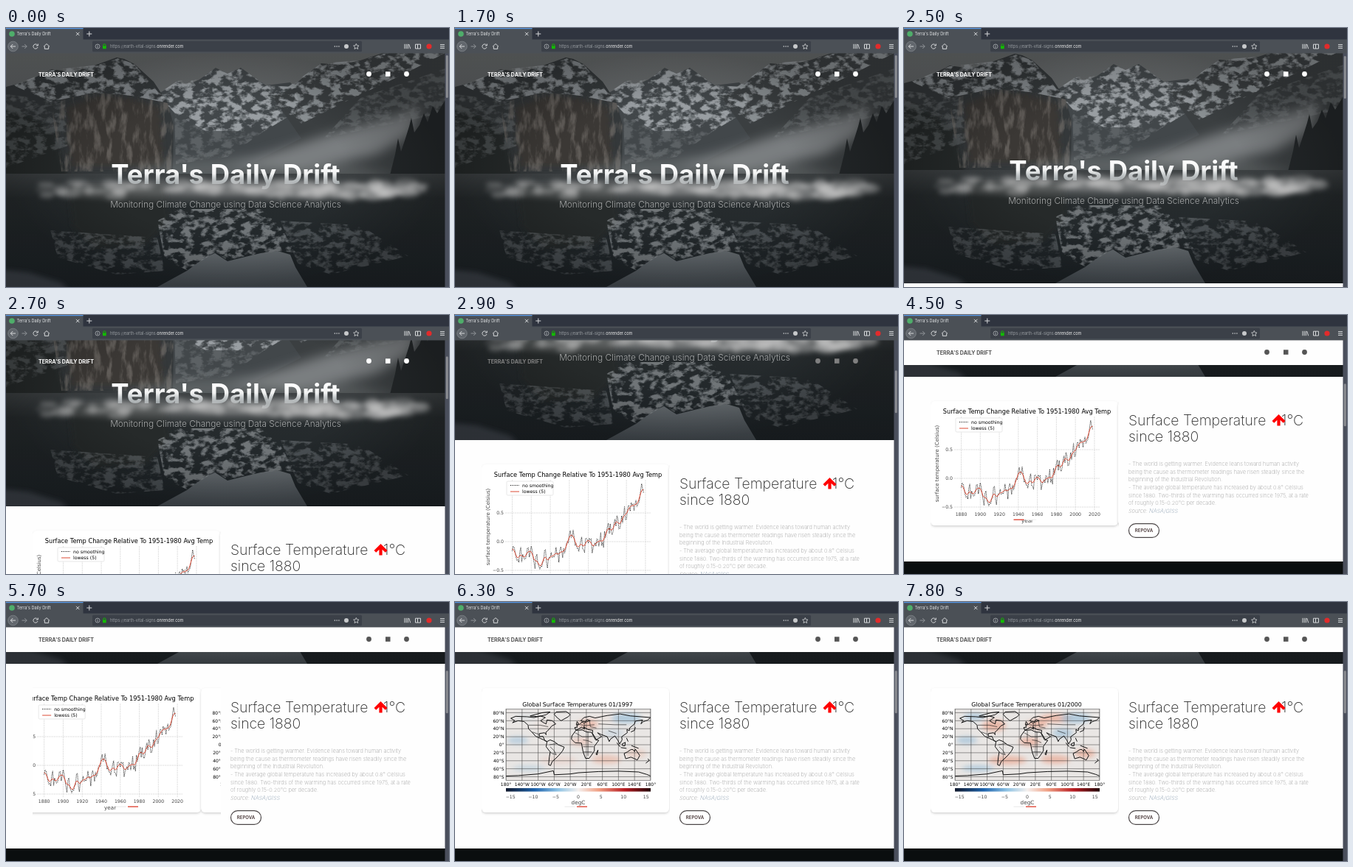
Recreate the animation shown at these times as an HTML page. Size 600 px wide and 352 px high, loop 8000 ms.

```html
<!DOCTYPE html>
<html lang="en">
<head>
<meta charset="utf-8">
<title>Terra's Daily Drift</title>
<style>
  html, body { margin: 0; width: 100%; height: 100%; overflow: hidden; background: #fefefe; }
  svg { display: block; width: 100vw; height: 100vh; }
  text { font-family: Inter, sans-serif; white-space: pre; }
  .plot text { font-family: "DejaVu Sans", sans-serif; font-size: 6.2px; fill: #444; }
  .plot .title { font-size: 8.25px; fill: #000; }
  .mid { text-anchor: middle; }
  .end { text-anchor: end; }
  .line { fill: none; stroke-linejoin: round; }
  .world path { vector-effect: non-scaling-stroke; fill: none; stroke: #111; }
</style>
</head>
<body>
<svg viewBox="0 0 600 352">
  <defs>
    <linearGradient id="sky" x2="0" y2="1">
      <stop stop-color="#686b6c"/><stop offset=".5" stop-color="#606466"/><stop offset="1" stop-color="#4a4e50"/>
    </linearGradient>
    <linearGradient id="lake" x2="0" y2="1">
      <stop stop-color="#3c4042"/><stop offset=".22" stop-color="#272c2e"/><stop offset="1" stop-color="#1d2327"/>
    </linearGradient>
    <linearGradient id="mirror" x2="0" y2="1">
      <stop stop-color="#666c70"/><stop offset="1" stop-color="#474e54"/>
    </linearGradient>
    <linearGradient id="titleFill" gradientUnits="userSpaceOnUse" x1="0" x2="0" y1="186" y2="213">
      <stop stop-color="#fff"/><stop offset=".45" stop-color="#f1f2f2"/>
      <stop offset="1" stop-color="#b9c4c8" stop-opacity=".7"/>
    </linearGradient>
    <radialGradient id="shade">
      <stop offset=".55" stop-opacity="0"/><stop offset="1" stop-opacity=".25"/>
    </radialGradient>
    <linearGradient id="degrees">
      <stop stop-color="#10182c"/><stop offset=".2" stop-color="#1d63ad"/>
      <stop offset=".36" stop-color="#8fc3e4"/><stop offset=".5" stop-color="#f4f0ee"/>
      <stop offset=".64" stop-color="#f0a084"/><stop offset=".82" stop-color="#b81c22"/>
      <stop offset="1" stop-color="#230608"/>
    </linearGradient>
    <filter id="soft" x="-20%" y="-60%" width="140%" height="220%"><feGaussianBlur stdDeviation="3"/></filter>
    <filter id="softer" x="-30%" y="-60%" width="160%" height="220%"><feGaussianBlur stdDeviation="8"/></filter>
    <filter id="snow" color-interpolation-filters="sRGB">
      <feTurbulence type="fractalNoise" baseFrequency=".075 .12" numOctaves="4" seed="4"/>
      <feColorMatrix values="0 0 0 0 .6  0 0 0 0 .62  0 0 0 0 .635  5 0 0 0 -2.15"/>
      <feComposite operator="in" in2="SourceGraphic"/>
    </filter>
    <filter id="rock" color-interpolation-filters="sRGB">
      <feTurbulence type="fractalNoise" baseFrequency=".11 .035" numOctaves="4" seed="9"/>
      <feColorMatrix values="0 0 0 0 .48  0 0 0 0 .46  0 0 0 0 .44  4 0 0 0 -1.9"/>
      <feComposite operator="in" in2="SourceGraphic"/>
    </filter>
    <filter id="shadow" x="-10%" y="-10%" width="120%" height="125%">
      <feDropShadow dx="0" dy="1.5" stdDeviation="1.8" flood-opacity=".18"/>
    </filter>
    <clipPath id="card"><rect x="36" y="110" width="255" height="184"/></clipPath>
    <clipPath id="mapArea"><rect x="69" y="145.5" width="196" height="97"/></clipPath>
    <clipPath id="heroArea"><rect y="34" width="595" height="318"/></clipPath>
  </defs>

  <g id="page">
    <rect y="80" width="595" height="256" fill="#fefefe"/>
    <rect y="335" width="595" height="320" fill="#0a0e0f"/>

    <g transform="translate(0 -268)"><g clip-path="url(#heroArea)">
      <rect y="34" width="595" height="170" fill="url(#sky)"/>
      <path fill="#42474a" d="M205 90L219 82 232 72 245 78 262 70 284 54 300 62 318 54 335 66 352 78 385 74 430 120V200H205Z"/>
      <path fill="#3b3f41" d="M360 92L380 86 411 60 427 48 452 50 480 44 510 34H595V200H300L400 150Z"/>
      <path fill="#34383a" d="M0 80L30 72 62 56 90 60 125 49 150 40 160 42 174 49 200 73 219 102 227 132 226 200H0Z"/>
      <path fill="#3b3936" filter="url(#soft)" d="M82 108L125 92 170 96 208 108 214 188H88Z"/>
      <path fill="#25292b" filter="url(#soft)" d="M-9 105L30 118 66 140 84 205H-9Z"/>
      <g filter="url(#snow)">
        <path d="M205 90L232 72 262 70 284 54 300 62 318 54 352 78 390 80 400 110 350 140 270 140 228 115Z"/>
        <path opacity=".85" d="M365 92L427 48 480 44 515 34H595L540 62 460 100 400 130Z"/>
        <path opacity=".8" d="M10 78L62 57 125 50 152 41 174 49 219 102 170 92 120 88 60 100Z"/>
        <path opacity=".3" d="M0 90L80 100 84 160 0 190ZM595 55V115L430 150 480 95ZM228 115L270 140 350 140 300 175 230 185Z"/>
      </g>
      <path opacity=".6" filter="url(#rock)" d="M60 100L120 88 170 92 219 102 227 132 224 195H75Z"/>
      <g fill="#85898b" filter="url(#softer)">
        <path opacity=".85" d="M300 186L370 166 430 147 520 121 565 105 548 145 500 172 400 194Z"/>
        <path opacity=".4" d="M140 204L215 182 320 176 480 190 540 204Z"/>
      </g>
      <path fill="#24282a" d="M520 200L527 172 531 150 535 168 541 150 546 134 549 122 553 142 560 132 566 116 571 128 578 106 584 116 595 98V200Z"/>
      <rect y="198" width="595" height="154" fill="url(#lake)"/>
      <path fill="#262a2b" filter="url(#soft)" d="M85 215H215L222 260 190 295 120 300 90 270Z"/>
      <path fill="#3a4147" filter="url(#soft)" d="M-9 328L30 332 75 346 90 362H-9Z"/>
      <path fill="url(#mirror)" d="M205 352L245 330 268 313 283 306 300 317 320 312 345 306 368 303 385 308 392 325 408 352Z"/>
      <g filter="url(#snow)">
        <path opacity=".65" d="M205 262L235 246 345 246 372 270 392 305 368 303 320 311 300 316 283 305 245 329 215 315Z"/>
        <path opacity=".35" d="M60 275L205 285 215 330 150 335 70 312ZM372 262L480 268 545 310 440 335 395 320Z"/>
      </g>
      <rect y="34" width="595" height="318" fill="url(#shade)"/>
      <text class="mid" x="297.5" y="211.5" font-size="36.5" font-weight="700" fill="url(#titleFill)">Terra's Daily Drift</text>
      <g id="fog" fill="#c6c7c6" filter="url(#soft)"></g>
      <text class="mid" x="297.5" y="244" font-size="11.85" font-weight="300" fill="#fff" opacity=".58">Monitoring Climate Change using Data Science Analytics</text>
    </g></g>

    <g clip-path="url(#card)" class="plot">
      <g id="chartSlide">
        <rect x="36" y="117" width="254" height="169" rx="6" fill="#fff" filter="url(#shadow)"/>
        <text class="title mid" x="166.5" y="134">Surface Temp Change Relative To 1951-1980 Avg Temp</text>
        <g id="chart"></g>
        <rect x="70" y="140" width="63" height="19" rx="1.5" fill="#fff" stroke="#ddd" stroke-width=".7"/>
        <path d="M75 145.5H87" stroke="#000" stroke-dasharray="1 1.3"/>
        <path d="M75 154H87" stroke="#dc4a35"/>
        <text x="91" y="147.8" style="fill:#000">no smoothing</text>
        <text x="91" y="156.4" style="fill:#000">lowess (5)</text>
        <text class="mid" style="font-size:7.2px" x="167" y="282">year</text>
        <text class="mid" style="font-size:7px" transform="translate(46.5 202) rotate(-90)">surface temperature (Celsius)</text>
      </g>
      <g id="mapSlide">
        <rect x="36" y="117" width="254" height="169" rx="6" fill="#fff" filter="url(#shadow)"/>
        <text id="mapTitle" class="title mid" style="font-size:7.9px" x="166" y="141.5"></text>
        <g clip-path="url(#mapArea)">
          <rect x="69" y="145" width="196" height="98" fill="#e9e6e4"/>
          <g id="heat" filter="url(#soft)"></g>
          <g id="grid"></g>
          <g class="world" transform="translate(167 194) scale(.544 -.544)">
            <path d="M-168 66L-156 71-128 70-110 68-95 72-82 68-94 60-88 56-80 52-78 62-65 60-56 52-66 47-70 42-76 35-81 31-80 25-84 30-97 28-97 20-88 21-83 10-78 8-86 12-95 16-106 21-115 31-124 40-125 49-135 58-150 60-164 55-158 60Z"/>
            <path d="M-78 8L-70 12-60 8-50 0-35-6-39-15-48-26-57-35-65-42-69-52-74-50-72-30-70-18-80-5Z"/>
            <path d="M-55 82L-30 83-20 75-25 70-43 60-53 68-60 76ZM-120 72L-105 76-90 80-70 82-80 75-100 70Z"/>
            <path d="M-6 36L10 37 20 32 33 31 43 12 51 11 40-4 40-15 33-26 27-34 18-34 12-18 9-2 8 4-8 5-17 14-16 22Z"/>
            <path d="M-9 43L-2 44-4 48 5 52 9 57 14 54 22 58 30 60 22 63 17 57 6 60 14 68 28 71 42 67 72 73 104 77 130 72 180 68 172 61 162 58 156 52 160 62 142 59 140 52 128 42 127 35 121 38 122 30 108 20 109 12 103 2 98 12 91 22 80 14 77 8 72 20 56 26 48 30 58 20 45 13 35 29 36 36 24 38 13 45 16 39 8 44 0 39-6 36Z"/>
            <path d="M114-22L122-18 131-12 136-12 140-17 142-11 153-27 147-38 138-34 131-31 118-35Z"/>
            <path d="M131 32L140 36 142 44M96 5L104-5M106-7L120-9M109 2L117 6 116-3 110-2ZM132-2L150-9M120 17L124 8M173-35L177-39 168-46M44-24L49-13 47-25ZM-5 50L1 52-3 58Z"/>
            <path d="M-180-78L-150-77-100-73-62-65-60-75-20-73 0-70 50-67 100-66 150-68 170-74 180-78"/>
            <path stroke-width=".6" d="M-8 30L10 20 25 20 36 22M12 12L24 10 35 5M12-5L38-5M13-18L34-18M24 32V-28M0 35V7M5 50L20 48 40 50M15 54V40M28 60L30 45 45 42M50 52L90 50 120 50M75 35L95 28M-124 49L-95 49-75 45M-141 70V60M-115 32L-98 26M-70-5L-60-15-55-25-65-22-70-18M-72 0L-52 3"/>
          </g>
        </g>
        <rect x="69" y="145.5" width="196" height="97" fill="none" stroke="#555" stroke-width=".6"/>
        <g id="mapLabels"></g>
        <rect x="69" y="253" width="196" height="4.6" fill="url(#degrees)"/>
        <text class="mid" style="font-size:7.3px" x="167" y="274.7">degC</text>
      </g>
      <path id="dotA" d="M148.5 278.2H162.5" stroke-width="1.4"/>
      <path id="dotB" d="M165 278.2H179" stroke-width="1.4"/>
    </g>

    <g font-size="19.4" font-weight="200" fill="#222">
      <text x="304" y="149.5">Surface Temperature</text>
      <text x="511" y="149.5">1°C</text>
      <text x="304" y="171.5">since 1880</text>
    </g>
    <path fill="#f00" d="M507.5 135L516.5 144 513.8 146.7 509.6 142.7V150.5H505.4V142.7L501.2 146.7 498.5 144Z"/>
    <g id="story" font-size="7.4" font-weight="200" fill="#999"></g>
    <rect x="304.5" y="283.7" width="41" height="18.6" rx="9.3" fill="#fff" stroke="#4c4748" stroke-width="1.2"/>
    <text class="mid" x="325" y="295.2" font-size="6" font-weight="700" fill="#5a4b4b">REPOVA</text>
  </g>

  <rect id="navBack" y="34" width="595" height="34" fill="#fefefe"/>
  <g id="nav">
    <text x="44" y="65.6" font-size="7.1" font-weight="700">TERRA'S DAILY DRIFT</text>
    <circle cx="491.5" cy="62.5" r="3.4"/><rect x="514" y="59.3" width="6.5" height="6.5"/><circle cx="542.5" cy="62.5" r="3.4"/>
  </g>

  <rect x="594.5" y="34" width="5.5" height="318" fill="#4a4f5c"/>
  <rect id="thumb" x="595.8" y="37" width="3" height="58" rx="1.5" fill="#8b8d92"/>

  <rect width="600" height="16" fill="#2f343f"/>
  <rect y="15.5" width="600" height="18.9" fill="#4b5056"/>
  <rect width="104.5" height="16" fill="#4b5056"/>
  <rect width="104.5" height="1.2" fill="#5294e2"/>
  <circle cx="8" cy="8" r="3.8" fill="#4fae6a"/>
  <text x="14.5" y="10.2" font-size="5.6" fill="#e4e6e8">Terra's Daily Drift</text>
  <rect x="117" y="17.8" width="365" height="14.4" rx="1.5" fill="#3b4048"/>
  <circle cx="9.5" cy="25" r="6.8" fill="#62676d" stroke="#858a8f" stroke-width=".7"/>
  <g fill="none" stroke="#d6d8da">
    <path d="M95 5.8L99.4 10.2M99.4 5.8L95 10.2M109.3 8H116.3M112.8 4.5V11.5"/>
    <path d="M13 25H6.3M9.3 22L6.3 25 9.3 28"/>
    <path stroke="#8f9397" d="M21.5 25H28.2M25.2 22L28.2 25 25.2 28"/>
    <path d="M42.6 23.3A3.1 3.1 0 1 0 43 26M43.3 21.5V24H40.8M51 25.2L55 21.6 59 25.2M52.3 25V28.4H57.7V25"/>
    <circle cx="124" cy="25" r="3" stroke="#a9adb1" stroke-width=".8"/><path stroke="#a9adb1" d="M124 24.4V26.8M124 22.8V23.6"/>
    <path stroke="#12bc00" d="M131.6 25V23.5A1.7 1.7 0 0 1 135 23.5V25"/>
    <path stroke-width=".8" d="M474.3 21.4L475.4 23.8 478 24.1 476.1 25.9 476.6 28.5 474.3 27.2 472 28.5 472.5 25.9 470.6 24.1 473.2 23.8Z"/>
    <path d="M540 21.8V28.2M542.2 21.8V28.2M544.4 21.8V28.2M545.8 22L547.6 28.2M554.5 22.2H561.5V28H554.5ZM557.5 22V28M588 22.6H594M588 25H594M588 27.4H594"/>
    <path stroke-width="1.6" stroke-linecap="round" stroke-dasharray="0 2.8" d="M445.3 25H451"/>
  </g>
  <rect x="131" y="24.3" width="4.7" height="4" rx=".5" fill="#12bc00"/>
  <circle cx="461" cy="25" r="3" fill="#c7c9cb"/>
  <circle cx="573" cy="25" r="3.6" fill="#e22b2b"/>
  <text x="141" y="27" font-size="5.5" fill="#989ca1">https://earth-vital-signs.<tspan fill="#eee">onrender.com</tspan></text>
</svg>

<script>
const LOOP = 8000, SCROLL_END = 268;
const el = id => document.getElementById(id);
const clamp = v => Math.min(1, Math.max(0, v));
const mix = (a, b, k) => a + (b - a) * k;
const shift = (id, x, y) => el(id).setAttribute('transform', `translate(${x} ${y})`);
const label = (x, y, s, cls = 'mid', style = '') => `<text class="${cls}" x="${x}" y="${y}" style="${style}">${s}</text>`;

let seed = 7;
const random = () => (seed = seed * 16807 % 2147483647) / 2147483647;

// Yearly temperature anomalies since 1880, in hundredths of a degree
const anomalies = `-16 -8 -10 -17 -28 -33 -31 -36 -17 -10 -35 -22 -27 -31 -30 -23 -11 -11 -27 -17
  -8 -15 -28 -37 -47 -26 -22 -39 -43 -48 -43 -44 -36 -34 -15 -14 -36 -46 -30 -27
  -27 -19 -28 -26 -27 -22 -10 -22 -20 -36 -16 -9 -16 -28 -12 -20 -15 -3 0 -2
  13 19 7 9 20 9 -7 -3 -11 -11 -17 -7 1 8 -13 -14 -19 5 6 3 -3 6 3 5 -20 -11 -6 -2 -8 5
  3 -8 1 16 -7 -1 -10 18 7 16 26 32 14 31 16 12 18 32 39 27 45 40 22 23 31 45 33 46 61 38
  39 54 63 62 53 68 64 66 54 66 72 61 65 68 75 90 101 92 85`.trim().split(/\s+/).map(Number);

const smooth = anomalies.map((_, i) => {
  let sum = 0, total = 0;
  anomalies.forEach((v, j) => {
    const weight = Math.exp(-((i - j) ** 2) / 6);
    sum += weight * v;
    total += weight;
  });
  return sum / total;
});

const yearX = year => 77.5 + (year - 1880) * 1.289;
const tempY = v => 222 - v * .78;
const trace = values => 'M' + values.map((v, i) => `${yearX(1880 + i).toFixed(1)} ${tempY(v).toFixed(1)}`).join('L');

function buildChart() {
  let out = '', lines = '';
  for (let year = 1880; year <= 2020; year += 20) {
    lines += `M${yearX(year)} 138V266`;
    out += label(yearX(year), 273.2, year);
  }
  for (const v of [50, 0, -50]) {
    lines += `M68 ${tempY(v)}H265`;
    out += label(66, tempY(v) + 2.3, (v / 100).toFixed(1).replace('-', '−'), 'end');
  }
  el('chart').innerHTML = `<path d="${lines}" stroke="#d4d4d4" stroke-width=".7" stroke-dasharray="2.5 .7"/>${out}
    <path class="line" d="${trace(anomalies)}" stroke="#111" stroke-width="1" stroke-dasharray="1 1.2"/>
    <path class="line" d="${trace(smooth)}" stroke="#dc4a35" stroke-width="1"/>`;
}

function buildMap() {
  let out = '', lines = '';
  const black = 'fill:#000;font-size:6px';
  for (let lat = 80; lat >= -80; lat -= 20) {
    const y = 194 - lat * .544;
    lines += `M69 ${y}H265`;
    out += label(66.5, y + 2.2, Math.abs(lat) + '°' + (lat > 0 ? 'N' : lat < 0 ? 'S' : ''), 'end', black);
  }
  for (let lon = -180; lon <= 180; lon += 40) {
    const x = 167 + lon * .544;
    lines += `M${x} 145V243`;
    out += label(x, 249.6, Math.abs(lon) + '°' + (Math.abs(lon) === 180 ? '' : lon < 0 ? 'W' : 'E'), 'mid', black);
  }
  for (let v = -15; v <= 15; v += 5) out += label(167 + v * 6.12, 266.6, String(v).replace('-', '−'));
  el('grid').innerHTML = `<path d="${lines}" stroke="#333" stroke-width=".5"/>`;
  el('mapLabels').innerHTML = out;
}

// Warm and cold regions: x, y, width, height, colour
const warm = '#e9967a', cold = '#86b5d6';
const regions = [
  [205, 158, 22, 6, warm], [232, 158, 20, 7, cold], [122, 168, 16, 8, warm], [180, 166, 14, 6, warm],
  [95, 156, 14, 5, cold], [85, 188, 14, 5, cold], [140, 215, 26, 6, warm], [205, 214, 20, 6, warm],
  [215, 178, 14, 6, cold], [100, 226, 22, 4, cold], [170, 190, 14, 6, warm], [245, 206, 14, 6, warm]
];

const fog = Array.from({ length: 90 }, () => ({
  x: 55 + 505 * random(), y: 210 + 19 * random(), rx: 6 + 14 * random(), ry: 3 + 5 * random()
}));

const ellipse = (x, y, rx, ry, opacity, fill = '') =>
  `<ellipse cx="${x.toFixed(1)}" cy="${y}" rx="${rx}" ry="${ry}" opacity="${opacity.toFixed(2)}" ${fill && `fill="${fill}"`}/>`;

function buildStory() {
  const lines = ['- The world is getting warmer. Evidence leans toward human activity',
    'being the cause as thermometer readings have risen steadily since the',
    'beginning of the Industrial Revolution.',
    '- The average global temperature has increased by about 0.8° Celsius',
    'since 1880. Two-thirds of the warming has occurred since 1975, at a rate',
    'of roughly 0.15-0.20°C per decade.',
    '<tspan font-style="italic">Source: <tspan fill="#7d93a8">NASA/GISS</tspan></tspan>'];
  el('story').innerHTML = lines.map((s, i) => label(304, 205.2 + i * 10.6, s, '')).join('');
}

// Scroll offsets every 100 ms, beginning at 2400 ms
const scrollSteps = [0, 5, 38, 92, 142, 182, 214, 238, 255, 266, SCROLL_END];
const scrollAt = t => scrollSteps[Math.max(0, Math.min(10, Math.floor((t - 2400) / 100)))];

function drawFog(t) {
  el('fog').innerHTML = ellipse(305, 220, 265, 17, .16) + ellipse(315, 219, 210, 10, .18) + ellipse(330, 219, 120, 8, .22) +
    fog.map((f, i) => ellipse(f.x + 4 * Math.sin(t / 900 + i), f.y, f.rx, f.ry, .3)).join('');
}

function drawMap(year) {
  el('mapTitle').textContent = 'Global Surface Temperatures 01/' + year;
  el('heat').innerHTML = regions.map(([x, y, rx, ry, fill], i) =>
    ellipse(x, y, rx, ry, .3 + .25 * Math.cos((year - 2000) * (i + 1)), fill)).join('');
}

function draw(t) {
  const scroll = scrollAt(t);
  shift('page', 0, SCROLL_END - scroll);
  el('thumb').setAttribute('y', 37 + scroll * .21);
  if (t < 3100) drawFog(t);

  const solid = clamp((t - 2900) / 300);
  const grey = Math.round(mix(255, 85, clamp((t - 2750) / 200)));
  el('navBack').setAttribute('opacity', solid);
  el('nav').setAttribute('fill', `rgb(${grey},${grey},${grey})`);
  shift('nav', 0, -12 * solid);

  const u = clamp((t - 5450) / 850);
  const slide = 254 * (u < .5 ? 4 * u ** 3 : 1 - 4 * (1 - u) ** 3);
  shift('chartSlide', -slide, 0);
  shift('mapSlide', 254 - slide, 0);
  const second = t >= 5500;
  el('dotA').setAttribute('stroke', second ? '#eee' : '#e04a3a');
  el('dotB').setAttribute('stroke', second ? '#e04a3a' : '#f3f3f3');
  drawMap(2000 + Math.floor((t - 7800) / 500));
}

buildChart();
buildMap();
buildStory();

let shown = -1;
const start = performance.now();
function tick() {
  const t = Math.floor((performance.now() - start) % LOOP / 100) * 100;
  if (t !== shown) draw(shown = t);
  requestAnimationFrame(tick);
}
tick();
</script>
</body>
</html>
```
